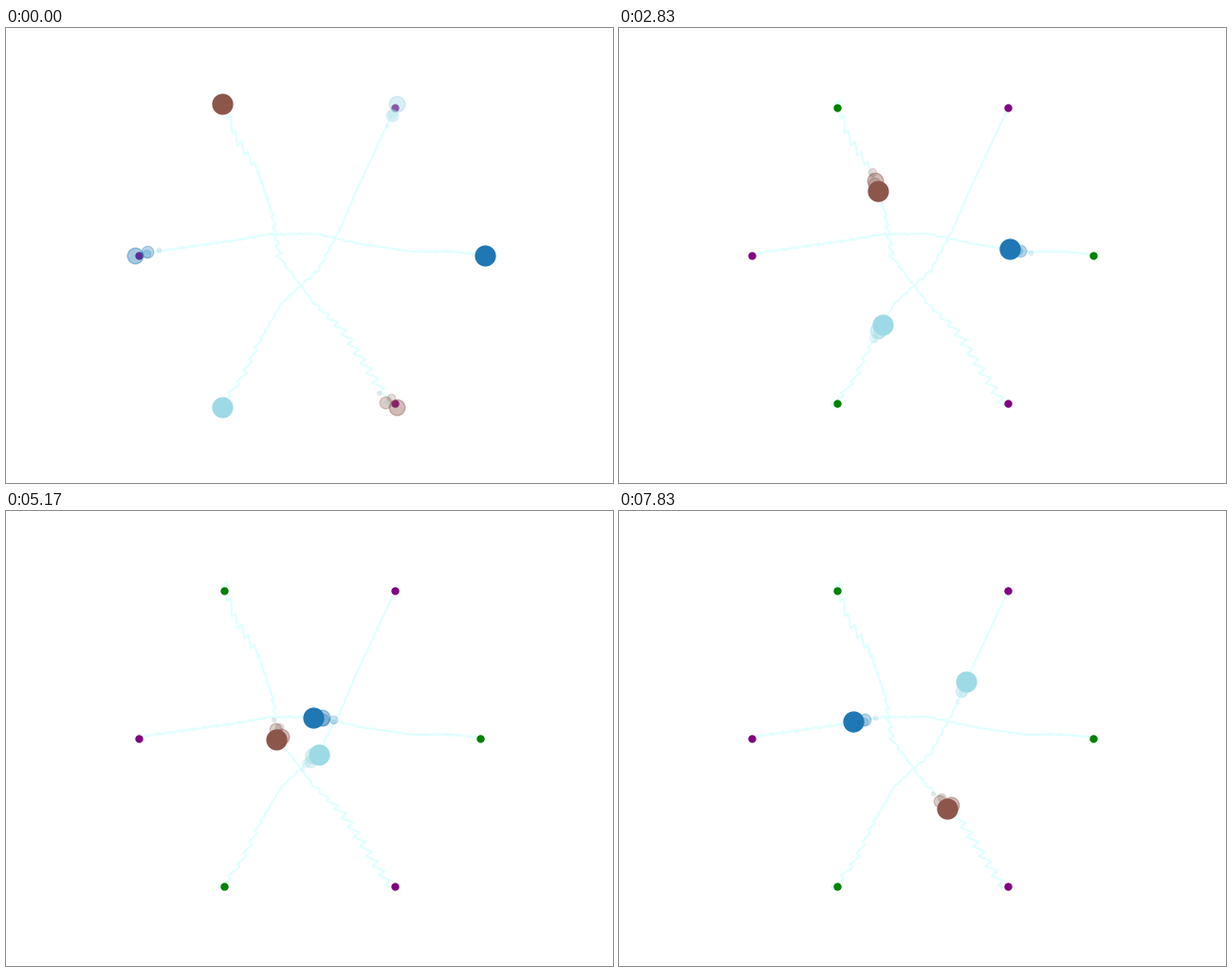
A matplotlib script that plays this animation: 640x480 px, repeating every 8 s.

```python
import numpy as np
import matplotlib.pyplot as plt
from matplotlib.animation import FuncAnimation

W, H, DPI = 640, 480, 100
LOOP_MS, TICK_MS = 8000, 40
MOVES = 48          # moves shown in one loop
LEAD_MS = 30        # a move never appears later than its due time
STEPS = 64          # length of each full walk
TAIL = 4            # ghosts behind each agent
SIZE = 15

PATH_STEPS = [0, 5, 12, 22, 31, 40, 47, 63]
SWAY_STEPS = [0, 31, 47]

# Colour, waypoints at PATH_STEPS, sideways swing at SWAY_STEPS
AGENTS = [
    ("#1f77b4",
     [(504.5, 240), (464, 235), (433.5, 236.5), (378.5, 228),
      (323.5, 217.5), (281, 216.5), (234.5, 226), (135.5, 240)],
     [(-5, -1), (-2, 0.5), (-3.7, 1.5)]),
    ("#8c564b",
     [(227.7, 80), (242, 108.5), (266, 155), (282.5, 198.5),
      (285, 240.5), (323, 290), (359.5, 318.5), (412.3, 400)],
     [(1.5, -6), (-3, -1), (4.7, 0)]),
    ("#9edae5",
     [(227.7, 400), (244, 372.5), (270, 328.5), (291, 289.5),
      (330, 256.5), (352, 211), (371, 168.5), (412.3, 80)],
     [(-4.5, 1.5), (1, 1), (1.5, -3)]),
]


def lerp(at, steps, points):
    return np.column_stack([np.interp(at, steps, axis) for axis in zip(*points)])


def swing(steps, sway):
    """Offset that changes side with every step."""
    steps = np.asarray(steps)
    side = np.where(steps % 2, 1, -1)[:, None]
    return side * lerp(steps, SWAY_STEPS, sway)


def build_walk(points, sway):
    """Zigzag about a centre line, passing through every waypoint."""
    steps = np.arange(STEPS)
    centre = np.array(points) - swing(PATH_STEPS, sway)
    return lerp(steps, PATH_STEPS, centre) + swing(steps, sway)


fig = plt.figure(figsize=(W / DPI, H / DPI), dpi=DPI, facecolor="white")
ax = fig.add_axes([0, 0, 1, 1])
ax.set_xlim(0, W)
ax.set_ylim(H, 0)
ax.axis("off")

walks = [build_walk(points, sway) for _, points, sway in AGENTS]
for walk in walks:
    ax.plot(*walk.T, color="lightcyan", lw=1.5, zorder=1)

# Starts and goals lie opposite each other on a circle
for k in range(3):
    angle = 2 * np.pi * k / 3
    dx, dy = 180 * np.cos(angle), 180 * np.sin(angle)
    for sign, color in ((1, "green"), (-1, "purple")):
        ax.plot(W / 2 + sign * dx, H / 2 + sign * dy, "o", color=color, ms=5, zorder=2)

# Each marker: artist, its walk, and how many steps it lags
markers = []
for (color, _, _), walk in zip(AGENTS, walks):
    for lag in range(TAIL, -1, -1):
        fade = 1 - lag / (TAIL + 1)
        dot, = ax.plot([], [], "o", color=color, ms=SIZE * fade,
                       alpha=0.5 * fade if lag else 1, zorder=3)
        markers.append((dot, walk, lag))


def update(tick):
    step = (tick * TICK_MS + LEAD_MS) * MOVES // LOOP_MS
    for dot, walk, lag in markers:
        x, y = walk[(step - lag) % STEPS]
        dot.set_data([x], [y])
    return [m[0] for m in markers]


anim = FuncAnimation(fig, update, frames=LOOP_MS // TICK_MS, init_func=lambda: update(0),
                     interval=TICK_MS, repeat=True, repeat_delay=0, blit=False)
plt.show()
```
